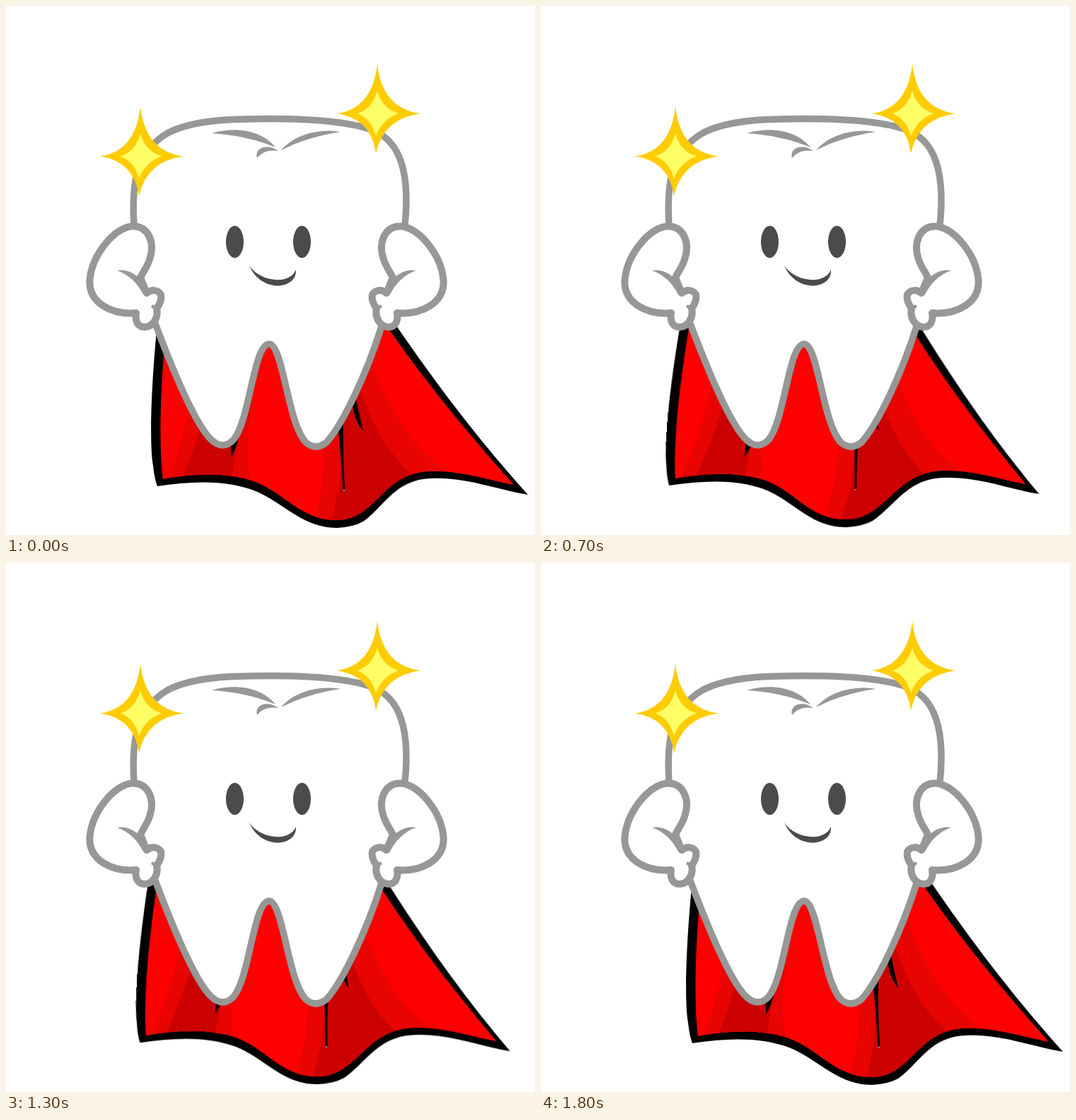
An HTML page that plays this animation: 748 by 748 pixels, repeating every 1900 ms.

```html
<!DOCTYPE html>
<html lang="en">
<head>
<meta charset="utf-8">
<title>Tooth with a cape</title>
<style>
  html, body { margin: 0; width: 100%; height: 100%; overflow: hidden; background: #fff; }
  svg { display: block; width: 100%; height: 100%; }
  .line { fill: none; stroke: #969896; stroke-width: 9.5; stroke-linejoin: round; }
  .white { fill: #fff; }
  .grey { fill: #969896; }
  .dark { fill: #4a4c4a; }
  .mid { fill: #e80400; }
  .deep { fill: #cc0000; }
</style>
</head>
<body>
<svg viewBox="0 0 748 748">
  <defs>
    <path id="lining" d="M229 430 C221 500 214 610 222 669 C260 662 310 658 350 672 C394 688 416 727 467 727
      C524 727 530 661 598 658 C640 656 680 670 718 677 C660 611 595 537 523 430 Z"/>
    <clipPath id="inside"><use href="#lining"/></clipPath>
    <g id="arm">
      <path class="line" style="fill:#fff;stroke-width:10" d="M184 434 C150 437 116 420 118.5 387 C122 350 155 311.500 180 311.500
        C202 311.500 210 335 204 355 C201 368 194 375 190 384 L199 406 C205 401 214 400 219 408
        C221 418 215 424 213 428 C216 440 208 454 196 454 C186 454 182 445 184 434 Z"/>
      <path class="grey" d="M157 374 C172 371 190 380 202 403 L194 408 C186 392 174 380 157 374 Z"/>
      <path class="line" style="stroke-width:5;stroke-linecap:round" d="M213 427 L208 425"/>
    </g>
    <g id="star">
      <path fill="#ffcc00" d="M525 82 Q532 145 586 152 Q534 159 523 208 Q516 159 468 152 Q518 145 525 82 Z"/>
      <path fill="#ffff66" d="M525 120 Q532 145 555 152 Q532 160 523 184 Q517 160 497 152 Q518 145 525 120 Z"/>
    </g>
  </defs>

  <g id="cape">
    <path d="M216 430 C208 500 201 610 208 650 Q210 669 214 679 C262 672 305 670 345 683 C390 698 416 738 468 738
      Q490 737 505 729 C535 708 550 669 602 668 C650 666 690 683 738 691 C671 617 604 530 537 430 Z"/>
    <use href="#lining" fill="#f00"/>
    <g clip-path="url(#inside)">
      <path class="mid" d="M268 500 Q262 590 227 675 L347 675 Q336 630 348 560 Z"/>
      <path class="deep" d="M285 550 Q274 610 247 675 L319 675 Q322 630 338 580 Z"/>
      <path class="mid" d="M433 530 Q466 640 433 735 L560 735 L626 662 Q545 600 514 490 Z"/>
      <path class="deep" d="M468 560 Q482 660 458 735 L545 735 L580 668 Q528 625 502 545 Z"/>
    </g>
    <path d="M468 580 L477 585 Q476 640 479.500 687 L477 687 Q474 640 468 580 Z"/>
    <path d="M486 545 L494 552 L505 601 Q497 592 492 575 Z"/>
    <path d="M318 616 L332 596 Q327 625 318 638 Z"/>
    <circle cx="478" cy="685" r="1.500" fill="#a77"/>
  </g>

  <path class="white" d="M181 310 L211 449 C234 510 266 590 290 613 Q307 629 322 613 C345 585 350 478 372 478
    C392 478 398 590 424 617 Q438 629 453 617 C476 592 510 520 531 453 L564 310 Z"/>
  <path class="line" d="M211 449 C234 510 266 590 290 613 Q307 629 322 613 C345 585 350 478 372 478
    C392 478 398 590 424 617 Q438 629 453 617 C476 592 510 520 531 453"/>
  <path class="line" d="M181 310 C177 245 186 205 228 180 C265 160 325 159.500 373 159.500
    C430 159.500 485 163 520 176 C545 187 574 215 564 310"/>

  <path class="grey" d="M291 180 C325 170 362 176 381 200 C355 189 325 182 291 180 Z"/>
  <path class="grey" d="M355 215 C351 200 370 194 385 205 C370 203 362 207 355 215 Z"/>
  <path class="grey" d="M389 204 C405 184 440 172 473 178 C440 183 412 192 389 204 Z"/>
  <ellipse class="dark" cx="323.500" cy="333.500" rx="12.500" ry="22.700"/>
  <ellipse class="dark" cx="418.500" cy="333.500" rx="12.500" ry="22.700"/>
  <path class="dark" d="M344 367 C358 389 400 396 410 373 C412 401 361 407 344 367 Z"/>

  <use href="#arm"/>
  <use href="#arm" transform="matrix(-1 0 0 1 737 0)"/>
  <use href="#star"/>
  <use href="#star" transform="translate(-335 60.500)"/>
</svg>
<script>
  const STEP = 100, PIVOT = 210;
  // Lean of the cape in degrees, one entry per step until the far point
  const out = [0, 0.67, 1.33, 2, 2.5, 3, 3.5, 4, 5, 6];
  const leans = [...out, ...out.slice(0, -1).reverse()];

  function pose(deg) {
    const skew = Math.tan(deg * Math.PI / 180);
    const tall = 1 - 0.0005 * deg;
    return `matrix(1, 0, ${-skew}, ${tall}, ${skew * PIVOT}, ${PIVOT * (1 - tall)})`;
  }

  const frames = [...leans, leans[0]].map((deg, i) => ({
    offset: i / leans.length,
    transform: pose(deg),
    easing: "step-end"
  }));
  document.getElementById("cape").animate(frames, {
    duration: leans.length * STEP,
    iterations: Infinity
  });
</script>
</body>
</html>
```
